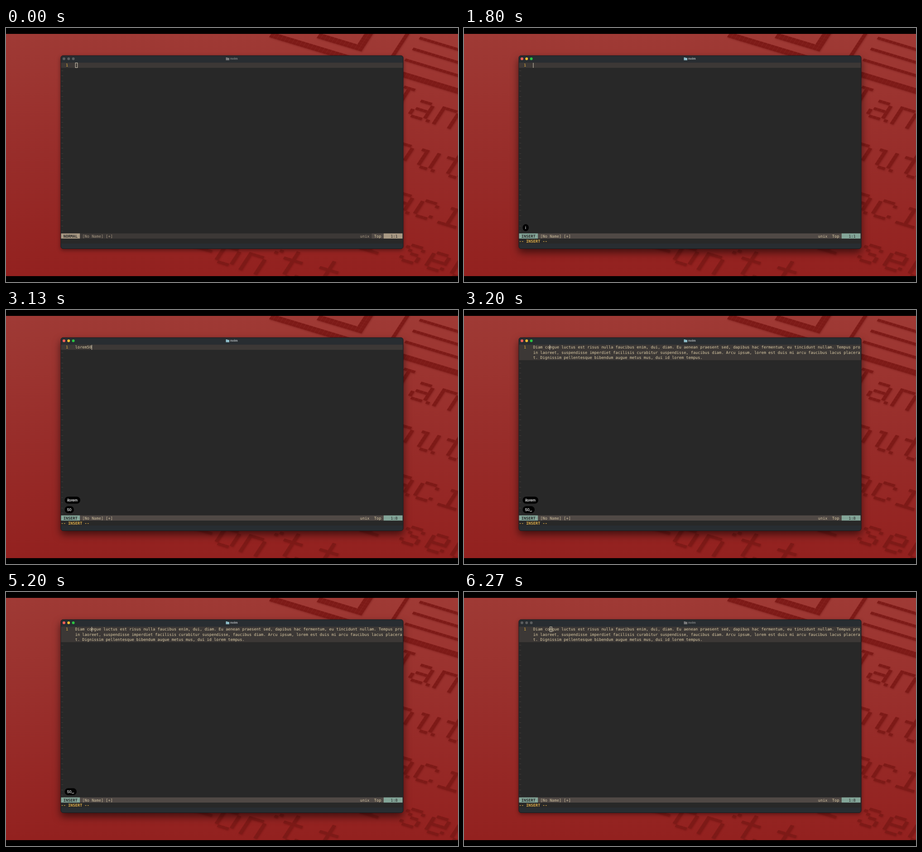
These frames come from a looping animation (998 px wide and 561 px high, 6.34 s). An HTML page:

```html
<!DOCTYPE html>
<html lang="en">
<head>
<meta charset="utf-8">
<title>nvim</title>
<style>
  html, body { margin: 0; width: 100%; height: 100%; overflow: hidden; background: #000; }
  svg { display: block; width: 998px; height: 561px; }
  text { font: 8.64px "DejaVu Sans Mono", monospace; text-rendering: geometricPrecision; white-space: pre; }
  .bold { font-weight: bold; }
  .pill text { font: 8.5px "Liberation Sans", sans-serif; fill: #fff; stroke: #fff; stroke-width: .2; }
  #title { font: bold 7px Inter, sans-serif; }
  #bricks { fill: #7d1a17; filter: drop-shadow(1px 2px 1.5px rgba(90, 8, 8, .3)); }
</style>
</head>
<body>
<svg viewBox="0 0 998 561">
  <defs>
    <linearGradient id="red" x2="0" y2="1">
      <stop stop-color="#9f3a35"/><stop offset=".5" stop-color="#982d2a"/><stop offset="1" stop-color="#93211f"/>
    </linearGradient>
  </defs>
  <rect y="13" width="998" height="535" fill="url(#red)"/>
  <g id="bricks"></g>
  <path d="M0 0H998V13H0ZM0 548H998V561H0Z"/>

  <rect id="frame" x="121" y="61" width="756" height="426.5" rx="5" fill="#282d31" stroke="#171b1e"/>
  <g id="lights"><circle cx="128" cy="68" r="3"/><circle cx="138.3" cy="68" r="3"/><circle cx="148.6" cy="68" r="3"/></g>
  <path id="folder" d="M485.5 65h3l1 1h3.5v5.3h-7.5z"/>
  <text id="title" x="495" y="70.4">nvim</text>
  <rect x="121.6" y="76.5" width="754.4" height="399.5" fill="#282828"/>

  <g id="tildes" fill="#4a4643"></g>
  <rect id="line" x="121.6" y="76.5" width="754.4" fill="#3c3836"/>
  <text x="132" y="85.3" fill="#eab640">1</text>
  <g id="buffer" fill="#ddcda7"></g>
  <rect id="cursor" y="77"/>

  <rect id="bar" x="121.6" y="453.7" width="754.4" height="11.4"/>
  <rect id="topBox" x="807.5" y="453.7" width="26" height="11.4" fill="#504945"/>
  <g id="accent"><rect x="121.6" y="453.7" width="41.6" height="11.4"/><rect x="833.8" y="453.7" width="41.6" height="11.4"/></g>
  <text id="mode" class="bold" x="126.8" y="462.5" fill="#282828"></text>
  <g id="info"><text x="168.4" y="462.5">[No Name] [+]</text><text x="781.8" y="462.5">unix</text></g>
  <text x="812.8" y="462.5" fill="#ddcda7">Top</text>
  <text id="pos" x="849.2" y="462.5" fill="#282828"></text>
  <text id="message" class="bold" x="121.6" y="473.9" fill="#dfae48">-- INSERT --</text>

  <g id="pillA" class="pill"><rect x="129.5" y="433.3" height="15.4" rx="7.7"/><text x="135" y="444"></text></g>
  <g id="pillB" class="pill"><rect x="129.5" y="433.3" height="15.4" rx="7.7"/><text x="135" y="444"></text>
    <path id="space" d="M145.5 443v1.6h4V443" fill="none" stroke="#fff" stroke-width=".9"/></g>
</svg>
<script>
const LOOP = 6340, CHAR = 5.2, ROW = 11.43, TEXT_X = 152.8;
const $ = id => document.getElementById(id);
const clamp = x => Math.min(1, Math.max(0, x));
const set = (el, attrs) => { for (const k in attrs) el.setAttribute(k, attrs[k]); };
function add(parent, tag, attrs, content = "") {
  const el = document.createElementNS("http://www.w3.org/2000/svg", tag);
  set(el, attrs);
  el.textContent = content;
  parent.append(el);
  return el;
}

// Wallpaper lettering: strokes on a slanted brick grid, each digit pair is column and row.
const glyphs = {
  J: "20 40|30 38 29 19 08", a: "13 33 44 48 59|46 16 07 08 19 39 48",
  n: "03 09|04 13 33 44 49", p: "03 09|04 13 33 44 48 39 19 09",
  u: "03 13 18 29 39 48 43|48 59", t: "20 28 39 49 58|03 43",
  c: "44 33 13 04 08 19 39 48", i: "13 23 29|09 49|20 20",
  s: "44 33 13 04 15 36 47 48 39 19 08", e: "06 46 44 33 13 04 08 19 39 48",
  o: "13 33 44 48 39 19 08 04 13", "'": "20 11"
};
const U = [8.3, 2.5], V = [-3.6, 5.5];
function bricks(x, y, strokes) {
  const g = add($("bricks"), "g", { transform: `matrix(${U} ${V} ${x} ${y})` });
  const cells = new Set();
  for (const points of strokes)
    for (let i = 1; i < points.length; i++) {
      const [ax, ay] = points[i - 1], dx = points[i][0] - ax, dy = points[i][1] - ay;
      const n = Math.max(Math.abs(dx), Math.abs(dy), 1);
      for (let k = 0; k <= n; k++) cells.add(Math.round(ax + dx * k / n) + "," + Math.round(ay + dy * k / n));
    }
  for (const cell of cells) {
    const [cx, cy] = cell.split(",");
    add(g, "rect", { x: cx - .47, y: cy - .47, width: .94, height: .94 });
  }
}
// Places a letter by the centre of its x-height box.
function letter(char, x, y) {
  const strokes = glyphs[char].split("|").map(s => s.split(" ").map(p => [+p[0], +p[1]]));
  bricks(x - 2 * U[0] - 6 * V[0], y - 2 * U[1] - 6 * V[1], strokes);
}
function word(chars, x, y) {
  [...chars].forEach((c, i) => letter(c, x + 56 * i, y + 17 * i));
}
word("Jan", 861, 164);
word("put", 872, 274);
word("aci", 872, 384);
word("sec", 897, 499);
word("on", 490, 503);
word("'", 587, 526);
word("t", 623, 530);
word("t", 702, 551);
word("i", 812, 475);
word("i", 445, 471);
bricks(590, 13, [[[0, 0], [52, 0]], [[0, 1], [52, 1]]]);
bricks(695, 15, [[[0, 0], [11, 0]], [[0, 1], [11, 1]], [[10, 0], [10, -7]], [[11, 0], [11, -7]]]);
bricks(886, 13, [[[0, 0], [0, 9]]]);
[[917, 23], [902, 47], [885, 71]].forEach(([x, y]) => bricks(x, y, [[[0, 0], [14, 0]]]));

for (let r = 1; r < 33; r++) add($("tildes"), "text", { x: 121.6, y: 85.3 + ROW * r }, "~");

const snippet = [
  "Diam congue luctus est risus nulla faucibus enim, dui, diam. Eu aenean praesent sed, dapibus hac fermentum, eu tincidunt nullam. Tempus pro",
  "in laoreet, suspendisse imperdiet facilisis curabitur suspendisse, faucibus diam. Arcu ipsum, lorem est duis mi arcu faucibus lacus placera",
  "t. Dignissim pellentesque bibendum augue metus mus, dui id lorem tempus."
];
const rows = snippet.map((_, r) => add($("buffer"), "text", { x: TEXT_X, y: 85.3 + ROW * r }));
const strokesAt = [2070, 2200, 2270, 2330, 2400, 2930, 3070];
const FOCUS = 800, INSERT = 1800, SECOND_PILL = 2930, EXPAND = 3200, BLUR = 6200;

function pill(el, label, width, y, opacity) {
  el.children[1].textContent = label;
  set(el.children[0], { width });
  set(el, { transform: `translate(0 ${y})`, opacity });
}

function draw(t) {
  const focused = t >= FOCUS && t < BLUR, insert = t >= INSERT, expanded = t >= EXPAND;
  const typed = "lorem50".slice(0, strokesAt.filter(s => t >= s).length);
  const col = expanded ? 7 : typed.length;

  $("frame").style.filter = `drop-shadow(${focused ? "0 8px 8.5px rgba(0,0,0,.56)" : "0 3px 4px rgba(0,0,0,.4)"})`;
  ["#f95f57", "#f5bd30", "#2bc543"].forEach((c, i) => set($("lights").children[i], { fill: focused ? c : "#5b5d5e" }));
  set($("folder"), { fill: focused ? "#8dbcc7" : "#77797a" });
  set($("title"), { fill: focused ? "#b0b6b9" : "#7f8283" });

  rows.forEach((row, r) => row.textContent = expanded ? snippet[r] : r ? "" : typed);
  set($("line"), { height: expanded ? 3 * ROW : ROW });
  const x = TEXT_X + CHAR * col;
  if (!focused) set($("cursor"), { x: x + .4, width: 4.6, height: 10.6, fill: "none", stroke: "#e6ddc8", "stroke-width": .9 });
  else set($("cursor"), { x: insert ? x - .3 : x, width: insert ? 1 : CHAR, height: 11, fill: insert ? "#d8d0bd" : "#fff", stroke: "none" });

  set($("bar"), { fill: insert ? "#504945" : "#3c3836" });
  set($("topBox"), { opacity: insert ? 0 : 1 });
  set($("accent"), { fill: insert ? "#83a598" : "#a89984" });
  set($("info"), { fill: insert ? "#cfc0a0" : "#a89984" });
  set($("message"), { opacity: insert ? 1 : 0 });
  $("mode").textContent = insert ? "INSERT" : "NORMAL";
  $("pos").textContent = "1:" + (col + 1);

  const keys = "i" + typed.slice(0, 5), widths = [13.5, 15, 19, 22, 27, 34.5];
  pill($("pillA"), keys, widths[keys.length - 1], t >= SECOND_PILL ? -21 : 0,
    insert ? clamp((4600 - t) / 270) : 0);
  pill($("pillB"), typed.slice(5), expanded ? 26.5 : typed.length > 6 ? 20.5 : 16, 0,
    t >= SECOND_PILL ? clamp((5330 - t) / 145) : 0);
  set($("space"), { opacity: expanded ? 1 : 0 });
}

function tick() {
  draw(performance.now() % LOOP);
  requestAnimationFrame(tick);
}
tick();
</script>
</body>
</html>
```
